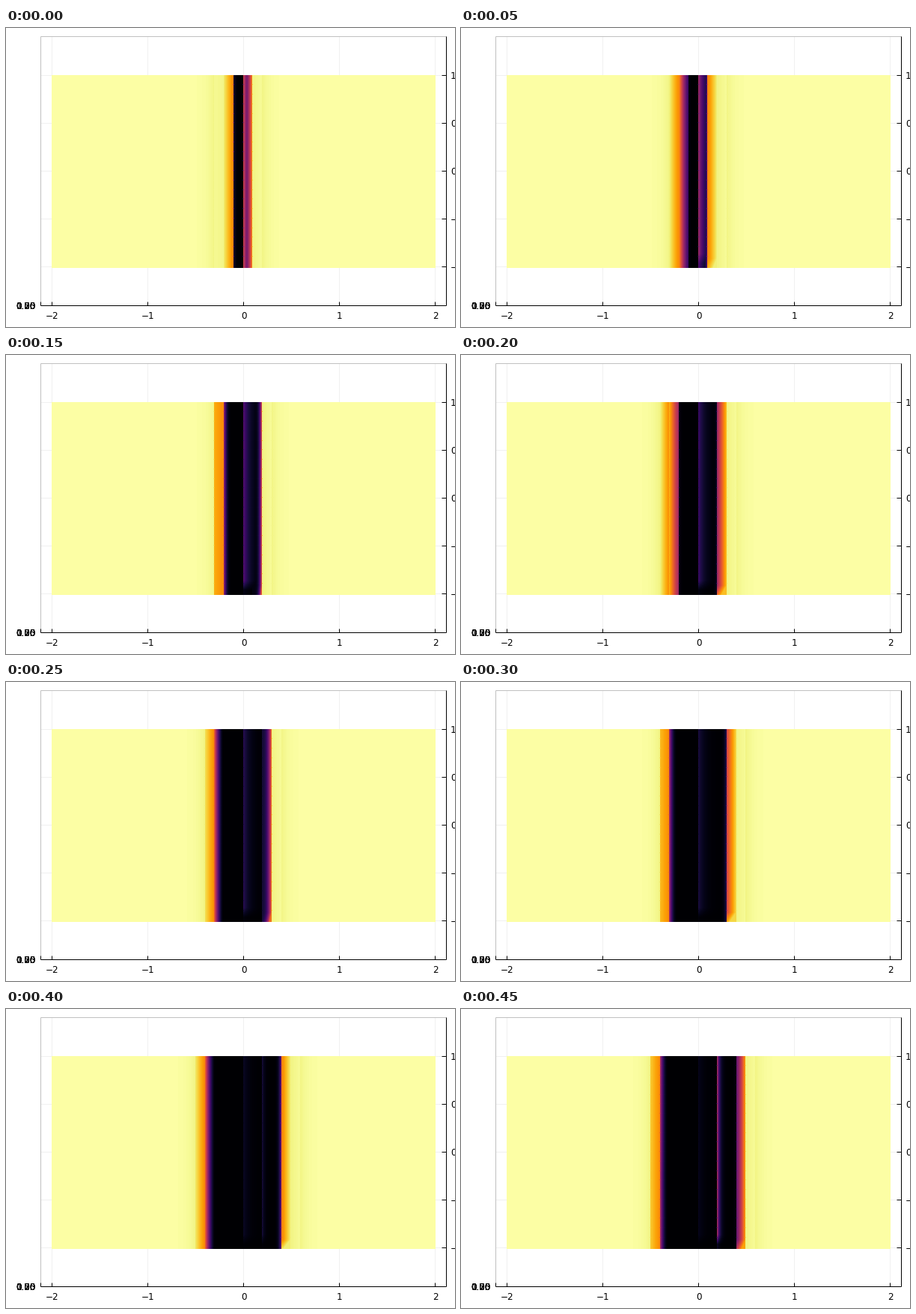
Write a matplotlib script that moves like this. It is 600x400 px and loops after 500 ms.

```python
import numpy as np
import matplotlib.pyplot as plt
from matplotlib.animation import FuncAnimation

W, H, DPI = 600, 400, 100
FRAMES, INTERVAL = 10, 50
PX = 72 / DPI
LEFT, RIGHT, TOP, BOTTOM = 46, 588, 11, 371   # axes box
X0, X1, Y0, Y1 = 61, 574, 63, 321             # heat map
CELL, MID = 12.76, 316.6                      # mesh width and centre line

u, depth = np.meshgrid((np.arange(X0, X1) + 0.5 - MID) / CELL,
                       (Y1 - np.arange(Y0, Y1) - 0.5) / CELL)
seams = (CELL * np.arange(1, 20)).astype(int)


def smooth(x):
    x = np.clip(x, 0, 1)
    return x * x * (3 - 2 * x)


def front(x, pos, start, end, power, behind, ahead):
    """Field around a front at pos, one ramp per mesh cell, outward along x.

    The front's own cell runs from start to end, the cell behind it rises
    to behind, and the cell ahead covers the pair ahead.
    """
    c = int(pos)
    f = x - np.floor(x)
    steps = [x < c - 1, x < c, x < c + 1, x < c + 2]
    values = [0 * x,
              behind * f ** 4,
              start + (end - start) * f ** power,
              ahead[0] + (ahead[1] - ahead[0]) * f]
    return np.select(steps, values, 1 - 0.035 * 0.3 ** (x - c - 2))


def left_front(step):
    pos = 1 + 0.3 * step
    q = pos % 1
    return front(-u, pos,
                 start=0.73 * (1 - smooth(q / 0.45)), end=0.95 - 0.6 * q,
                 power=1 + 3 * q ** 2, behind=0.1 * (1 - q) ** 4,
                 ahead=(0.97 - 0.23 * smooth(q / 0.15), 0.98 - 0.2 * q ** 2))


def right_front(step, rim):
    pos = 0.6 + 0.43 * step
    q, c = pos % 1, int(pos)
    # the front bends inwards near the lower edge
    bent = np.minimum(u + 0.8 * (1 - q) * rim, c + 0.99)
    x = np.where((u >= c) & (u < c + 1), bent, u)
    return front(x, pos,
                 start=0.75 * (1 - q) ** 1.5, end=0.97 - 0.36 * q,
                 power=1 + 5 * q ** 4, behind=0.32 * (1 - q) ** 4,
                 ahead=(0.965, 0.985))


def streak(at, height, decay):
    return np.where(u >= at, height * np.exp(-decay * (u - at)), 0)


def field_at(step):
    strength = min(1, step / 2)
    rim = strength * np.clip(1 - depth, 0, 1)
    fade = 1 - 0.85 * strength * np.clip(1.5 - depth, 0, 1)

    inner = np.maximum(streak(0, 0.6 * np.exp(-0.27 * step), 1.5),
                       streak(2, 0.5 * np.exp(1.5 * (step - 9)), 4))
    right = np.maximum(right_front(step, rim), inner * fade)
    field = np.where(u < 0, left_front(step), right)

    # mesh seams soften the jumps a little
    row = field[seams]
    field[seams] = (2 * row + np.roll(row, 1, 1) + np.roll(row, -1, 1)) / 4
    return field


fig = plt.figure(figsize=(W / DPI, H / DPI), dpi=DPI, facecolor="white")
ax = fig.add_axes([0, 0, 1, 1])
ax.axis("off")


def line(xs, ys, color="black", z=4):
    ax.plot(xs, ys, color=color, lw=PX, zorder=z, solid_capstyle="butt")


def label(x, y, text, align):
    ax.text(x, y, text.replace("-", "\u2212"), ha=align, va="baseline",
            fontsize=12 * PX, family="DejaVu Sans", color="black", zorder=5)


heat = ax.imshow(field_at(0), cmap="inferno", vmin=0, vmax=1, zorder=3,
                 extent=(X0, X1, Y1, Y0), interpolation="nearest",
                 aspect="auto")
ax.set_xlim(0, W)
ax.set_ylim(H, 0)

for i in range(5):
    x, y = 61.2 + 128 * i, 63.2 + 64 * i
    line([x, x], [TOP, BOTTOM], "#f0f0f0", z=1)
    line([LEFT, RIGHT], [y, y], "#f0f0f0", z=1)
    line([x, x], [BOTTOM - 5, BOTTOM])
    line([RIGHT - 6, RIGHT], [y, y])
    label(x + 0.4, 389, f"{i - 2}", "center")
    label(594, y + 4.5, f"{1 - i / 2:.1f}", "left")
    label(40, 375.5, f"{i / 4:.2f}", "right")

line([LEFT, LEFT], [TOP, BOTTOM], "#c0c0c0", z=2)
line([LEFT, RIGHT], [TOP, TOP], "#c0c0c0", z=2)
line([LEFT, RIGHT], [BOTTOM, BOTTOM])
line([RIGHT, RIGHT], [TOP, BOTTOM])
line([LEFT, LEFT], [BOTTOM - 5, BOTTOM])


def update(step):
    heat.set_data(field_at(step))
    return [heat]


anim = FuncAnimation(fig, update, frames=FRAMES, interval=INTERVAL,
                     repeat=True, repeat_delay=0, blit=False)
plt.show()
```
